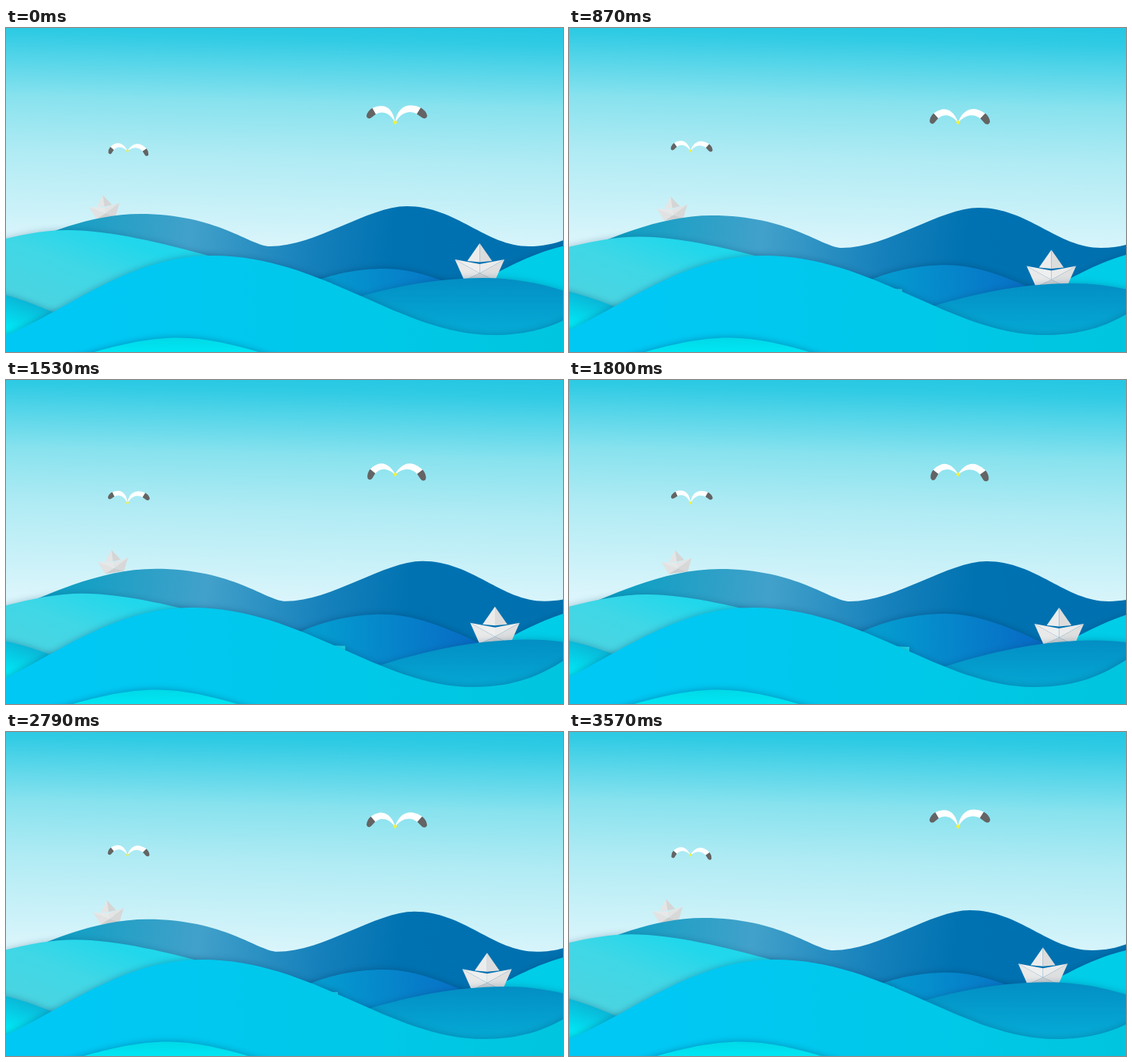
An HTML page with a canvas for the animation above (3600 ms loop, 720 by 420 pixels).

```html
<!DOCTYPE html>
<html lang="en">
<head>
<meta charset="utf-8">
<title>Paper boats</title>
<style>
html, body { margin: 0; width: 100%; height: 100%; overflow: hidden; }
canvas { display: block; }
</style>
</head>
<body>
<canvas id="stage" width="720" height="420"></canvas>
<script>
const ctx = document.getElementById('stage').getContext('2d');
const LOOP = 3600, STEP = 30, TURN = 1720, REACH = 1.04;
const DEGREE = Math.PI / 180;

function gradient(x0, y0, x1, y1, stops) {
  const g = ctx.createLinearGradient(x0, y0, x1, y1);
  for (const [at, color] of stops) g.addColorStop(at, color);
  return g;
}

const sky = gradient(600, 0, 593, 290, [
  [0, '#26c7e3'], [.07, '#30cbe4'], [.16, '#4dd3e8'], [.35, '#87e2ee'],
  [.6, '#b0ebf4'], [1, '#daf5fb']
]);

// A wave is a few crests and troughs, [x, y, roundness before, roundness after],
// and the distance it drifts over one swing.
const waves = {
  far: {
    turns: [[-60, 307, 40], [173, 241, 100], [341, 283, 25, 60], [518, 231, 50, 64],
      [676, 283, 56], [800, 250, 50]],
    drift: [22, 4],
    fill: gradient(50, 240, 700, 330, [[0, '#0d9fc3'], [.29, '#42a1ca'], [.53, '#1580bb'],
      [.69, '#0072b1'], [1, '#0070af']]),
    shadow: 0
  },
  blue: {
    turns: [[350, 346, 18], [490, 312, 80], [700, 382, 40]],
    drift: [-3, -9],
    fill: gradient(400, 0, 620, 0, [[0, '#049dd0'], [1, '#0868c4']]),
    shadow: .45
  },
  leftCyan: {
    turns: [[-140, 306, 47], [80, 262, 80, 110], [420, 330, 70]],
    drift: [20, 16],
    fill: gradient(130, 265, 90, 370, [[0, '#20d7eb'], [.5, '#40d7e6'], [1, '#4ad4e1']]),
    shadow: .28
  },
  rightCyan: {
    turns: [[540, 352, 66], [770, 277, 106]],
    drift: [21, 16],
    fill: '#00cde8',
    shadow: .3
  },
  harbor: {
    turns: [[330, 390, 16], [617, 324, 140, 120], [860, 390, 50]],
    drift: [62, 13.5],
    fill: gradient(0, 325, 0, 400, [[0, '#038fc4'], [1, '#05add7']]),
    shadow: .3
  },
  corner: {
    turns: [[-60, 337, 84], [140, 405, 14]],
    drift: [21, -3],
    fill: gradient(32, 355, 18, 394, [[0, '#0ab5d6'], [1, '#00e6f4']]),
    shadow: .35
  },
  near: {
    turns: [[-80, 416, 116], [267, 295, 142], [630, 398, 120], [850, 325, 90]],
    drift: [-29, 0],
    fill: gradient(100, 0, 720, 0, [[0, '#00c8f5'], [.65, '#00c8e7'], [1, '#00c5de']]),
    shadow: .35
  },
  bottom: {
    turns: [[60, 436, 10], [222, 401.5, 70], [385, 436, 20]],
    drift: [-30, 0],
    fill: gradient(0, 402, 0, 421, [[0, '#00d9e8'], [1, '#00e7f3']]),
    shadow: .4
  }
};

function drawWave({ turns, drift, fill, shadow }, k) {
  ctx.save();
  ctx.translate(drift[0] * k, drift[1] * k);
  ctx.beginPath();
  ctx.moveTo(turns[0][0], 460);
  let [lastX, lastY, lastRound] = turns[0];
  ctx.lineTo(lastX, lastY);
  for (const [x, y, before, after = before] of turns.slice(1)) {
    ctx.bezierCurveTo(lastX + lastRound, lastY, x - before, y, x, y);
    [lastX, lastY, lastRound] = [x, y, after];
  }
  ctx.lineTo(lastX, 460);
  ctx.closePath();
  ctx.shadowColor = `rgba(0, 55, 100, ${shadow})`;
  ctx.shadowBlur = shadow ? 10 : 0;
  ctx.fillStyle = fill;
  ctx.fill();
  ctx.restore();
}

function facet(color, ...points) {
  ctx.beginPath();
  points.forEach(p => ctx.lineTo(...p));
  ctx.closePath();
  ctx.fillStyle = color;
  ctx.fill();
}

// The boat's own origin is the middle of the hull's upper edge.
function drawBoat(x, y, scale, angle, light) {
  const gray = level => `rgb(${[0, 0, 0].fill(level * light)})`;
  const top = [0, -27], notch = [0, 0], core = [0, 12];
  ctx.save();
  ctx.translate(x, y);
  ctx.rotate(angle);
  ctx.scale(scale, scale);
  facet(gray(236), top, [-16, -4], [0, -2.5]);
  facet(gray(220), top, [0, -2.5], [16, -4]);
  for (const side of [-1, 1]) {
    const tip = [32 * side, -6], keel = [20 * side, 21];
    facet(gray(237 - 2 * side), tip, notch, core);
    facet(gray(228 - 5 * side), tip, core, keel);
  }
  facet(gray(212), core, [-20, 21], [20, 21]);
  ctx.restore();
}

function drawWing(side, angle) {
  ctx.save();
  ctx.scale(side, 1);
  ctx.rotate(angle);
  if (side > 0) ctx.scale(1.12, 1.03);
  ctx.beginPath();
  ctx.moveTo(0, 1);
  ctx.bezierCurveTo(1, -9, 6, -21, 18, -21);
  ctx.quadraticCurveTo(24, -21, 30, -18);
  ctx.lineTo(25.5, -10);
  ctx.bezierCurveTo(19, -14, 8, -15, 0, 1);
  ctx.fillStyle = '#fff';
  ctx.fill();
  ctx.beginPath();
  ctx.moveTo(29.5, -18.2);
  ctx.quadraticCurveTo(35.5, -14.5, 37, -8.5);
  ctx.bezierCurveTo(37, -4.5, 33, -3.6, 30.5, -6);
  ctx.lineTo(25, -10.3);
  ctx.fillStyle = '#646464';
  ctx.fill();
  ctx.restore();
}

// Wings fold in a little as they come down.
function drawBird(x, y, size, tilt, droop) {
  const scale = size * (1 - .0025 * droop);
  ctx.save();
  ctx.translate(x, y);
  ctx.rotate(tilt * DEGREE);
  ctx.scale(scale, scale);
  drawWing(-1, droop * DEGREE);
  drawWing(1, droop * DEGREE);
  facet('#f2f03a', [-3, 0], [0, -2.6], [3, 0], [0, 3.4]);
  ctx.restore();
}

function draw(now) {
  const t = Math.floor(now % LOOP / STEP) * STEP;
  const k = REACH * (t < TURN ? t / TURN : (LOOP - t) / (LOOP - TURN));

  ctx.fillStyle = sky;
  ctx.fillRect(0, 0, 720, 420);
  drawBird(503, 122, 1, 0, 22 * k);
  drawBird(157, 159, .69, 2, 21 - 24 * k);
  drawBoat(127.5 + 12 * k, 233 + 4 * k, .62, -.14, .97);
  drawWave(waves.far, k);
  drawWave(waves.blue, k);
  drawWave(waves.leftCyan, k);
  drawWave(waves.rightCyan, k);
  drawBoat(612.3 + 21.3 * k, 306 + 16 * k, 1, 0, 1);
  drawWave(waves.harbor, k);
  drawWave(waves.corner, k);
  drawWave(waves.near, k);
  drawWave(waves.bottom, k);
}

function frame() {
  draw(performance.now());
  requestAnimationFrame(frame);
}
frame();
</script>
</body>
</html>
```
